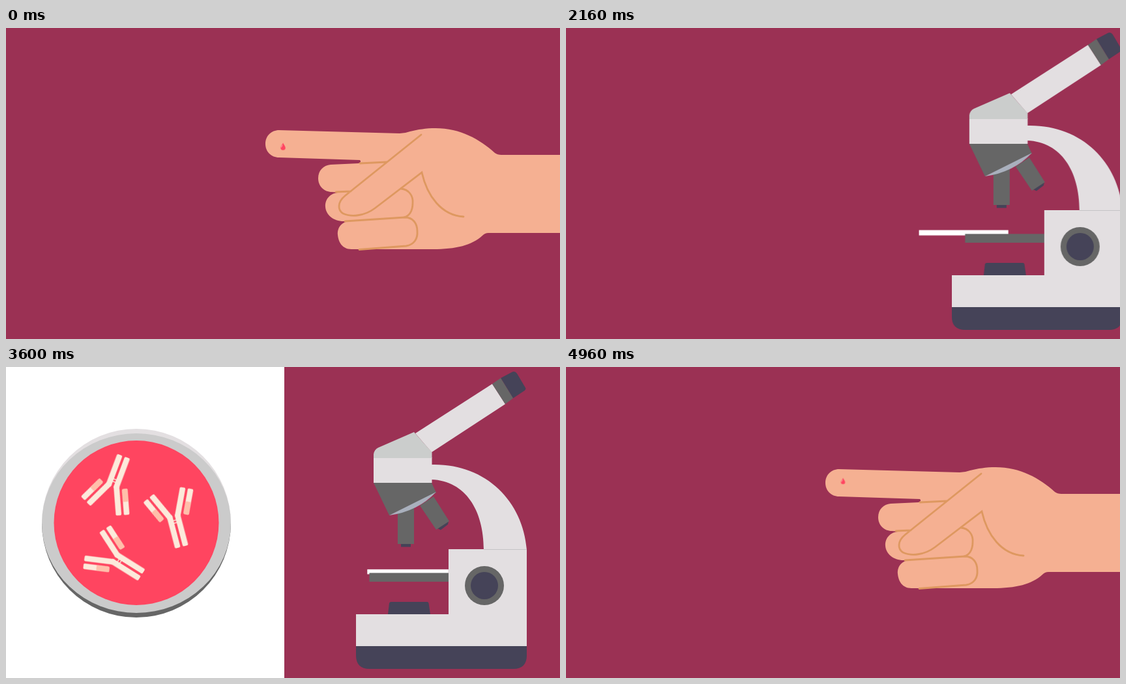
These frames come from a looping animation (850x478 px, 5.04 s). An HTML page:

```html
<!DOCTYPE html>
<html lang="en">
<head>
<meta charset="utf-8">
<title>Blood test</title>
<style>
html, body { margin: 0; width: 100%; height: 100%; overflow: hidden; background: #9b3154; }
svg { display: block; width: 100vw; height: 100vh; }
.move { animation: 5040ms linear infinite; }

#hand { animation-name: hand; }
#drop { animation-name: drop; }
#slide { animation-name: slide; }
#scope { animation-name: scope; }
#right { animation-name: leave-right; }
#left { animation-name: leave-left; }
#panel { animation-name: panel; }
#dish { animation-name: dish; }
.cell { animation-name: drift; }

@keyframes hand {
  0%, .4% { transform: translate(0, 0); animation-timing-function: ease-in-out; }
  10.7%, 11.1% { transform: translate(0, -345px); }
  11.2%, 92.06% { transform: translate(460px, 0); animation-timing-function: cubic-bezier(.2, .6, .3, 1); }
  98%, 100% { transform: translate(0, 0); }
}
@keyframes drop {
  0% { transform: translate(425px, 182px) scale(.68); animation-timing-function: cubic-bezier(.3, .4, .6, 1); }
  11.11% { transform: translate(425px, 244.7px) scale(1); }
  22.22% { transform: translate(425px, 274px) scale(1.1); }
  26% { transform: translate(425px, 314px) scale(1.1); }
  26.1%, 96.8% { transform: translate(425px, 171px) scale(0); }
  98.41% { transform: translate(425px, 175.2px) scale(.58); }
  100% { transform: translate(425px, 182px) scale(.68); }
}
@keyframes slide {
  0%, 14.3% { transform: translate(425px, 447px) scale(0); }
  22.22% { transform: translate(425px, 379px) scale(.724); animation-timing-function: ease-out; }
  26.98% { transform: translate(425px, 314.7px) scale(1); animation-timing-function: ease-in; }
  31.75% { transform: translate(425px, 314.7px) scale(.893); }
  33.33% { transform: translate(425px, 314.7px) scale(.77); animation-timing-function: cubic-bezier(.3, .5, .4, 1); }
  46%, 100% { transform: translate(616.7px, 314.7px) scale(.2); }
}
@keyframes scope {
  0%, 33.33% { transform: translateX(320px); animation-timing-function: cubic-bezier(.3, .4, .6, .9); }
  44.44% { transform: translateX(40px); animation-timing-function: ease-out; }
  49.2%, 100% { transform: translateX(0); }
}
@keyframes panel {
  0%, 44.44% { transform: translateX(-427px); animation-timing-function: cubic-bezier(.3, .3, .6, .9); }
  50.79% { transform: translateX(-34px); animation-timing-function: ease-out; }
  53.97%, 100% { transform: translateX(0); }
}
@keyframes dish {
  0%, 50.79% { transform: translateY(386px); animation-timing-function: cubic-bezier(.3, .4, .6, .9); }
  55.56% { transform: translateY(71px); animation-timing-function: cubic-bezier(.3, .5, .6, .9); }
  61.9% { transform: translateY(20.5px); animation-timing-function: ease-out; }
  69%, 100% { transform: translateY(0); }
}
@keyframes drift {
  0%, 50.79% { transform: translate(var(--from)) rotate(var(--turn)); }
  90.48%, 100% { transform: translate(var(--to)) rotate(var(--end)); }
}
@keyframes leave-right {
  0%, 84.2% { transform: translateX(0); animation-timing-function: ease-in; }
  90.4%, 100% { transform: translateX(325px); }
}
@keyframes leave-left {
  0%, 84.2% { transform: translateX(0); animation-timing-function: ease-in; }
  90.4%, 100% { transform: translateX(-430px); }
}
</style>
</head>
<body>
<svg viewBox="0 0 850 478">
  <defs>
    <g id="half">
      <rect x="1.9" y="-2" width="8.6" height="51" rx="2"/>
      <g transform="translate(6.2 1) rotate(25)">
        <rect x="-4.3" y="-44" width="8.6" height="47" rx="2"/>
        <rect x="8" y="-44" width="8.6" height="40" rx="2"/>
        <rect x="8" y="-24" width="8.6" height="20" rx="2" fill="#ffbfaa"/>
      </g>
    </g>
    <g id="antibody" fill="#fceadb">
      <use href="#half"/>
      <use href="#half" transform="scale(-1 1)"/>
      <path d="M-3 7H3M-3 11H3" stroke="#fceadb" stroke-width="1.5"/>
    </g>
  </defs>

  <rect width="850" height="478" fill="#9b3154"/>

  <g id="hand" class="move">
    <path fill="#f5b092" d="M419 157L604 162Q612 162 620 159C632 156 644 154 659 154C697 154 727 171 750 192Q754 195 760 195H850V315H740Q735 315 731 319C715 334 690 340 655 340H530C516 340 510 329 509 318C508 306 516 297 528 297H518C502 297 491 287 490 275C489 262 499 253 511 253L500 252C488 252 479 243 479 231C479 219 487 211 498 210L541 208Q546 206 543 203L419 199C407 199 398 190 398 178C398 166 407 157 419 157Z"/>
    <path fill="none" stroke="#de9860" stroke-width="2.8" stroke-linecap="round" d="M637 164L520 258C508 268 509 280 517 285C530 291 550 289 566 277L638 222C646 258 668 288 702 290M543 208L584 206M506 252L529 251M606 247C618 248 625 258 624 269C624 282 618 290 610 291M520 297L612 291C624 291 631 300 631 312C632 324 626 333 614 335L542 340.5"/>
  </g>

  <g id="drop" class="move">
    <path fill="#ff4560" d="M0-8C3-3 5.5 0 5.5 3A5.5 5 0 0 1-5.5 3C-5.5 0-3-3 0-8Z"/>
    <path fill="#ffb3b8" d="M-.6-5C-3-1.5-4.4 0-4.3 3C-3 1-1-1-.6-5Z"/>
  </g>

  <g id="right" class="move">
    <rect id="slide" class="move" x="-312" y="-18.5" width="624" height="37" fill="#fff"/>
    <g id="scope" class="move">
      <g fill="#e3dfe1">
        <path d="M628 102L746 26L766 57L653 131Z"/>
        <path d="M653 150C735 148 793 205 799 281H733C733 220 705 175 653 173Z"/>
        <path d="M564 139H653.5V178H564ZM679 280H799V429H537V380H679Z"/>
      </g>
      <path fill="#cbcdcc" d="M564 140V134Q565 127 571 124L626 100L653.5 131V140Z"/>
      <path stroke="#c5c3c5" d="M733 280.5H799"/>
      <g fill="#454358">
        <path d="M759 17L777 7.500Q781 6 784 10L797 32Q798 34 796 36L778 48Z"/>
        <path d="M606 271H621V276.500H606ZM662 248L679 237L678 242L667 250.500Z"/>
        <path d="M586 380L588 363Q588.500 361 591 361H646Q648 361 648.500 363L651 380Z"/>
        <path d="M537 429H799V443Q799 464 778 464H558Q537 464 537 443Z"/>
      </g>
      <g fill="#666">
        <path d="M746 26L759 17L778 48L766 57Z"/>
        <path d="M601 215H626V272H601ZM635 213L656 199L680 237L660 250Z"/>
        <path d="M564 178H653L660 193L588 228Z"/>
        <path d="M557.500 316.500H679V330H557.500Z"/>
        <circle cx="734" cy="336" r="30"/>
      </g>
      <path fill="#a9b0bd" d="M588 228L660 192Q632 222 588 228Z"/>
      <circle cx="734" cy="336" r="21" fill="#454358"/>
    </g>
  </g>

  <g id="left" class="move">
    <rect id="panel" class="move" width="427" height="478" fill="#fff"/>
    <g id="dish" class="move">
      <path fill="#e3dfe1" d="M55 240A145 145 0 0 1 345 240Z"/>
      <path fill="#666" d="M55 240A145 145 0 0 0 345 240Z"/>
      <ellipse cx="200" cy="240" rx="145" ry="138" fill="#cbcbcb"/>
      <circle cx="200" cy="239.500" r="126.500" fill="#ff4560"/>
      <g class="move cell" style="--from:180px,170px;--turn:199.500deg;--to:148px,195px;--end:201.500deg"><use href="#antibody"/></g>
      <g class="move cell" style="--from:259px,261.500px;--turn:3deg;--to:255.400px,199px;--end:-31deg"><use href="#antibody"/></g>
      <g class="move cell" style="--from:152.500px,283.500px;--turn:-36.500deg;--to:179.300px,303px;--end:-77.500deg"><use href="#antibody"/></g>
    </g>
  </g>
</svg>
</body>
</html>
```
